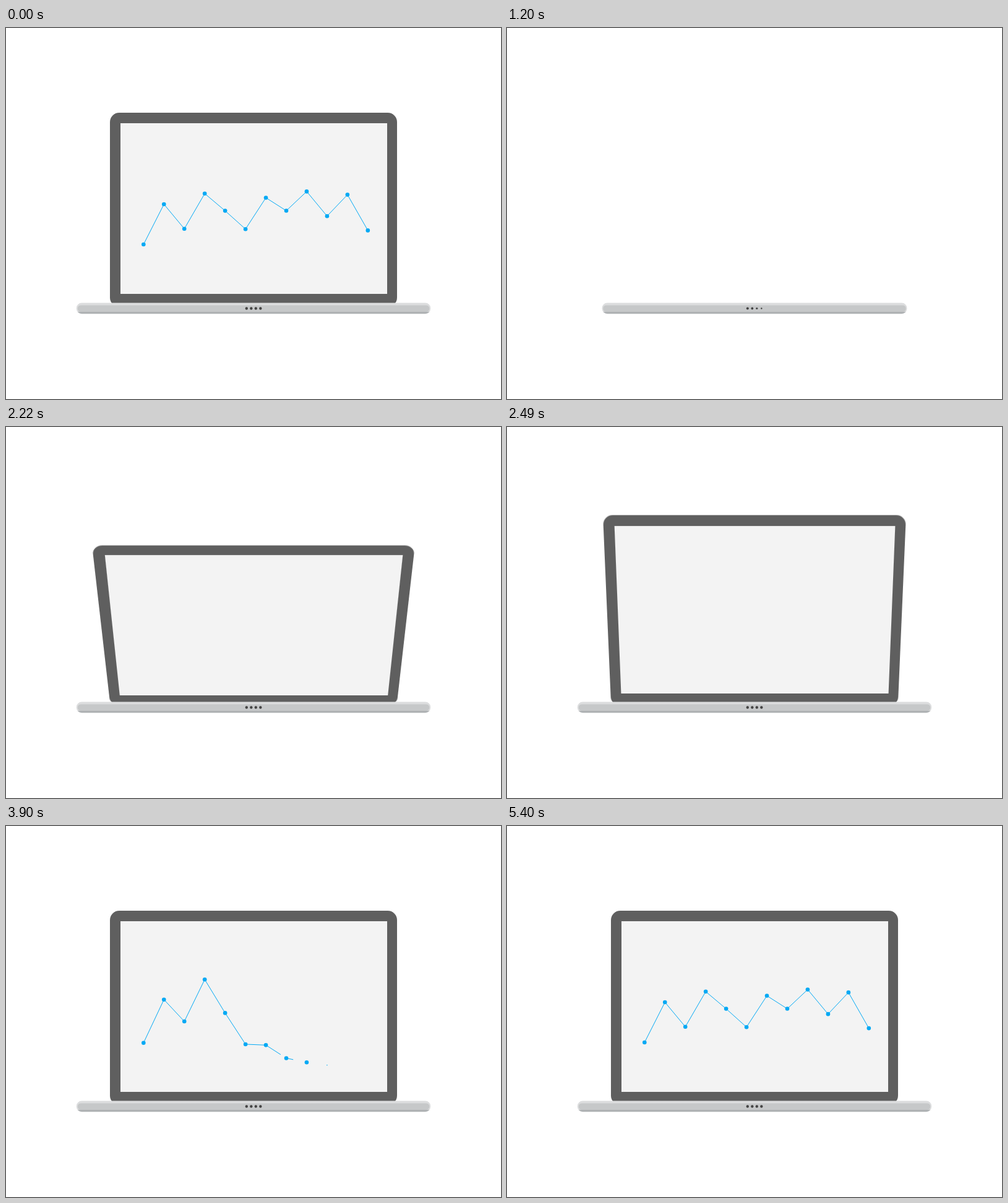
Recreate the animation shown at these times as an HTML page. Size 800x600 px, loop 5430 ms.

```html
<!DOCTYPE html>
<html lang="en">
<head>
<meta charset="utf-8">
<title>Laptop chart</title>
<style>
  html, body { margin: 0; width: 100%; height: 100%; overflow: hidden; background: #fff; }
  .stage { position: absolute; left: 0; top: 0; width: 800px; height: 600px; overflow: hidden; perspective: 1723px; }
  .lid {
    position: absolute; left: 168px; top: 137px; width: 464px; height: 314px;
    border-radius: 15px; background: #5f5f5f;
    transform-origin: 50% 308px; backface-visibility: hidden;
    animation: open 5430ms linear infinite;
  }
  .screen { position: absolute; left: 16.5px; top: 17px; width: 431px; height: 276px; background: #f3f3f3; }
  svg { position: absolute; left: 0; top: 0; }
  .shell { --x: 113.8px; --w: 572.4px; }
  .face { --x: 115.8px; --w: 568.4px; }
  .shell, .face { x: var(--x); width: var(--w); animation: grow 5430ms linear infinite; }

  @keyframes grow {
    0%, 11.049%, 38.122%, 100% { x: var(--x); width: var(--w); }
    11.05% { x: 400px; width: 0px; animation-timing-function: cubic-bezier(.165, .84, .44, 1); }
  }
  @keyframes open {
    0%, 11.049%, 64.733%, 100% { transform: rotateX(0deg); }
    11.05% { transform: rotateX(-90deg); }
    31.584% { transform: rotateX(-90deg); animation-timing-function: cubic-bezier(.345, 0, 0, 1); }
  }
</style>
</head>
<body>
<div class="stage"><div class="lid"><div class="screen"></div></div></div>
<svg width="800" height="600" viewBox="0 0 800 600">
  <defs>
    <linearGradient id="edge" x1="0" y1="444.6" x2="0" y2="462.2" gradientUnits="userSpaceOnUse">
      <stop offset=".8" stop-color="#dcddde"/>
      <stop offset=".8" stop-color="#afb2b4"/>
    </linearGradient>
  </defs>
  <rect class="shell" y="444.6" height="17.6" rx="8.5" fill="url(#edge)"/>
  <rect class="face" y="448.4" height="10.7" rx="5" fill="#c6c8c9"/>
  <g id="lights" fill="#444"></g>
  <g id="lines" stroke="#03a9f4" stroke-width="1"></g>
  <g id="points" fill="#03a9f4"></g>
</svg>
<script>
  const LOOP = 5430, HOLD = 600;
  const FLOOR = 387, FIRST = 2965, STAGGER = 100, RISE = 535;
  const heights = [350, 285, 324.7, 267.8, 295.6, 325.2, 274.5, 295.5, 264.4, 304.2, 269.6, 327.4];

  const clamp = v => Math.max(0, Math.min(1, v));
  const set = (el, attrs) => { for (const k in attrs) el.setAttribute(k, attrs[k]); };
  const make = (tag, parent, count) => Array.from({ length: count }, () =>
    document.getElementById(parent).appendChild(document.createElementNS('http://www.w3.org/2000/svg', tag)));

  const lights = make('circle', 'lights', 4);
  const lines = make('line', 'lines', heights.length - 1);
  const points = make('circle', 'points', heights.length);

  // Accelerates to the goal, then rings around it.
  function spring(age) {
    if (age <= 0) return 0;
    const k = age / RISE;
    if (k < 1) return k ** 2.55 + 0.1 * k * (1 - k);
    const past = age - RISE;
    return 1 + 0.362 * Math.exp(-0.00515 * past) * Math.sin(Math.PI * past / 340);
  }

  function draw(t) {
    const still = t < HOLD;

    lights.forEach((el, i) => {
      const k = still ? 1 : clamp((t - 885 - 60 * i) / 500);
      set(el, { cx: 388.8 + 7.5 * i, cy: 453.5, r: 2.2 * (1 - (1 - k) ** 3) });
    });

    const spots = heights.map((h, i) => {
      const age = still ? 1e5 : t - FIRST - STAGGER * i;
      return { x: 222.3 + 32.955 * i, y: FLOOR + (h - FLOOR) * spring(age), age };
    });

    points.forEach((el, i) => {
      const { x, y, age } = spots[i];
      set(el, { cx: x, cy: y, r: 3.3 * clamp(age / 80) });
    });

    lines.forEach((el, i) => {
      const a = spots[i], b = spots[i + 1];
      const k = clamp((a.age - 130) / 260);
      set(el, {
        x1: a.x, y1: a.y,
        x2: a.x + (b.x - a.x) * k, y2: a.y + (b.y - a.y) * k,
        visibility: k ? 'visible' : 'hidden'
      });
    });
  }

  // The chart follows the clock of the lid.
  const clock = document.querySelector('.lid').getAnimations()[0];
  function tick() {
    draw((clock.currentTime || 0) % LOOP);
    requestAnimationFrame(tick);
  }
  tick();
</script>
</body>
</html>
```
